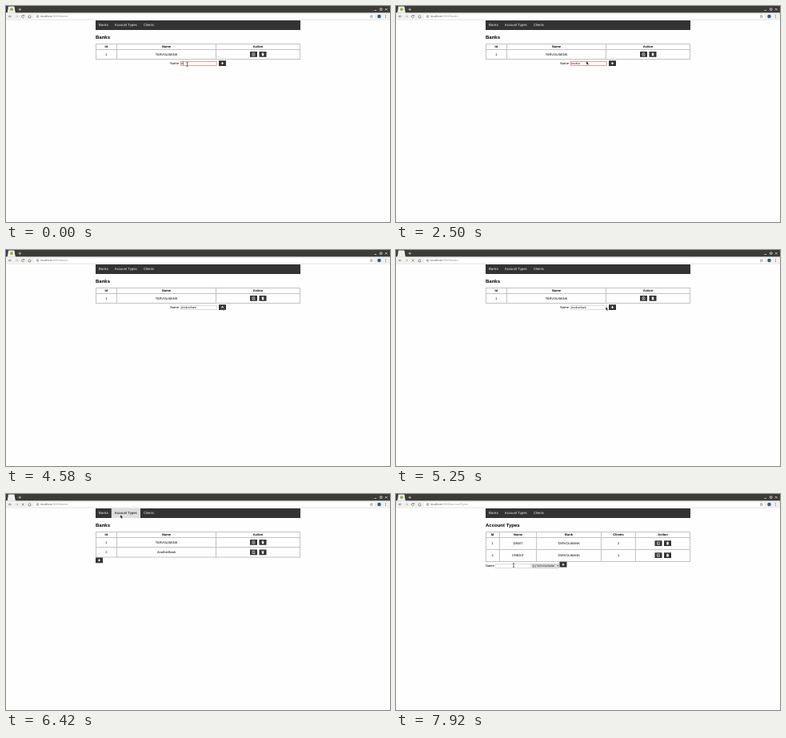
These frames come from a looping animation (480x270 px, 8000 ms). An HTML page:

```html
<!DOCTYPE html>
<html lang="en">
<head>
<meta charset="utf-8">
<title>Banks</title>
<style>
  html, body { margin: 0; width: 100%; height: 100%; overflow: hidden; background: #fff; }
  svg { display: block; width: 480px; height: 270px; }
  text { font: 16px "Liberation Sans", Arial, sans-serif; text-rendering: geometricPrecision; white-space: pre; }
  .mid { text-anchor: middle; }
  .bold { font-weight: bold; }
  .title { font-size: 24px; font-weight: bold; }
  .nav { font-size: 17px; fill: #f2f2f2; }
  .field { font-size: 13.33px; }
  .url { font-size: 14.7px; fill: #999; }
  .grid { stroke: #c3c3c7; stroke-width: 4; fill: none; }
  .icon { fill: none; stroke: #666; stroke-width: 2.5; }
</style>
</head>
<body>
<svg id="stage" viewBox="0 0 1920 1080">
  <rect width="1920" height="1080" fill="#fefefe"/>
  <g id="chrome"></g>
  <g id="nav"></g>
  <g id="pages"></g>
  <g id="arrow"><path d="M0 0V17L4 13.5L7 20L10.5 18.5L7.500 12.500H13Z" fill="#111" stroke="#fff" stroke-width="1.200"/></g>
  <g id="beam"><path d="M-4 -10Q0 -10 0 -7V7Q0 10 -4 10M4 -10Q0 -10 0 -7M0 7Q0 10 4 10" fill="none" stroke="#222" stroke-width="2.5"/></g>
</svg>
<script>
const LOOP = 8000, TICK = 1000 / 12;
const BANK = 'TARVOLIBANK', ENTRY = 'AnotherBank';
const $ = id => document.getElementById(id);
const show = (id, on) => $(id).setAttribute('visibility', on ? 'visible' : 'hidden');

const rect = (x, y, w, h, fill, extra = '') =>
  `<rect x="${x}" y="${y}" width="${w}" height="${h}" fill="${fill}" ${extra}/>`;
const text = (x, y, str, cls = '', extra = '') =>
  `<text x="${x}" y="${y}" class="${cls}" ${extra}>${str}</text>`;
const path = (d, cls = 'icon', extra = '') => `<path d="${d}" class="${cls}" ${extra}/>`;
const group = (id, ...parts) => `<g id="${id}" visibility="hidden">${parts.join('')}</g>`;

const button = (x, y, icon) =>
  `<g transform="translate(${x} ${y})">${rect(0, 0, 36, 27, '#333')}${icon}</g>`;
const PLUS = '<path d="M18 7V20M11.500 13.500H24.500" stroke="#fff" stroke-width="3.500"/>';
const EDIT = '<path d="M23 7H12V20H24V14M16 16L25 8" fill="none" stroke="#fff" stroke-width="2.500"/>';
const TRASH = '<path d="M11.500 6.500H16L17 5H19L20 6.500H24.500V9H11.500ZM13 10H23L22.500 21H13.500Z" fill="#fff"/>';
const actions = (x, y, gap) => button(x, y, EDIT) + button(x + gap, y, TRASH);

function table(cols, rows, heads, centers) {
  const [top, bottom, left, right] = [rows[0], rows.at(-1), cols[0], cols.at(-1)];
  const lines = cols.map(x => `M${x} ${top - 2}V${bottom + 2}`)
    .concat(rows.map(y => `M${left} ${y}H${right}`)).join('');
  return path(lines, 'grid') + heads.map((h, i) => text(centers[i], 208, h, 'mid bold')).join('');
}
const cells = (centers, y, values) =>
  values.map((v, i) => text(centers[i], y, v, 'mid')).join('');
const input = (x, y, color, width) =>
  rect(x + 1, y + 1, 180, 20, '#fff', `stroke="${color}" stroke-width="${width}"`);

// Browser frame
$('chrome').innerHTML = [
  rect(0, 0, 1920, 35, '#3c3b38'),
  rect(0, 34, 1920, 38, '#f1f1f0'),
  path('M4 35Q9 33 11 5Q12 2 16 2H38Q42 2 43 6Q45 33 50 35Z', '', 'fill="#f1f1f0"'),
  path('M69 10V24M62 17H76', '', 'stroke="#ccc" stroke-width="3"'),
  path('M1842 22H1852M1870 12H1880V21H1870ZM1896 12L1906 22M1906 12L1896 22', '',
    'fill="none" stroke="#ddd" stroke-width="3"'),
  rect(140, 39, 1704, 28, '#fff', 'rx="4" stroke="#ddd" stroke-width="1.5"'),
  path('M28 52H14M20 46L14 52L20 58'),
  path('M46 52H60M54 46L60 52L54 58', 'icon', 'opacity=".45"'),
  path('M110 53L118 45L126 53M113 52V59H123V52'),
  '<circle cx="158" cy="52" r="6" class="icon" style="stroke-width:2"/>',
  path('M158 51V56M158 48V49.500'),
  path('M1827 45L1829 50L1834 50.500L1830 54L1831 59L1827 56.500L1823 59L1824 54L1820 50.500L1825 50Z', 'icon', 'style="stroke-width:2"'),
  '<circle cx="1866" cy="52" r="9" fill="#355c7d"/>',
  path('M1898 45V48M1898 51V54M1898 57V60', 'icon', 'style="stroke-width:3.500"'),
  group('ready', '<circle cx="28" cy="17" r="8" fill="#93b745"/>',
    path('M90 49A6.500 6.500 0 1 0 90.500 55M91 44V50H85')),
  group('loading', path('M79 46L90 58M90 46L79 58'),
    '<path id="spinner" d="M28 9A8 8 0 0 1 36 17" fill="none" stroke="#ccc" stroke-width="2.5"/>'),
  text(172, 57, '<tspan fill="#555">localhost</tspan>:8080/<tspan id="route"></tspan>', 'url')
].join('');

$('nav').innerHTML = [
  rect(448, 72, 1024, 48, '#333'),
  group('hover', rect(527, 72, 145, 48, '#ddd')),
  text(464, 101.8, 'Banks', 'nav'),
  text(543.3, 101.8, 'Account Types', 'nav', 'id="types"'),
  text(687.7, 101.8, 'Clients', 'nav')
].join('');

// Pages
const bankCols = [450, 554, 1050, 1470], bankMid = [501, 802, 1260];
const typeCols = [450, 518, 702, 1026, 1198, 1470], typeMid = [482, 610, 864, 1112, 1334];
const bankHeads = ['Id', 'Name', 'Action'];

$('pages').innerHTML = [
  group('banks',
    text(448, 162.5, 'Banks', 'title'),
    table(bankCols, [190, 218, 266], bankHeads, bankMid),
    cells(bankMid, 247, ['1', BANK]), actions(1220, 228, 46)),
  group('bankForm',
    text(821, 292, 'Name'),
    group('invalid', input(872, 277, '#d98478', 3)),
    group('plain', input(872, 277, '#bbb', 2)),
    text(875, 291, '', 'field', 'id="entry"'),
    rect(0, 279, 2, 16, '#000', 'id="caret"'),
    button(1064, 273, PLUS)),
  group('bankAdded',
    table(bankCols, [266, 316], [], bankMid),
    cells(bankMid, 296.5, ['2', ENTRY]), actions(1220, 278, 46), button(448, 318, PLUS)),
  group('accounts',
    text(448, 162.5, 'Account Types', 'title'),
    table(typeCols, [190, 218, 278, 338], ['Id', 'Name', 'Bank', 'Clients', 'Action'], typeMid),
    cells(typeMid, 252.5, ['1', 'DEBIT', BANK, '2']), actions(1294, 233, 46),
    cells(typeMid, 313.5, ['2', 'CREDIT', BANK, '1']), actions(1294, 293, 46)),
  group('typeAdd', button(448, 339, PLUS)),
  group('typeForm',
    text(448, 364, 'Name'), input(495, 349, '#bbb', 2),
    rect(680, 350, 135, 20, '#e4e4e4', 'stroke="#aaa" stroke-width="2"'),
    text(684, 365, '[1] ' + BANK, 'field'),
    path('M804 357H812L808 363Z', '', 'fill="#333"'),
    button(818, 339, PLUS))
].join('');

// Keystroke times, one per letter of ENTRY
const KEYS = [-330, 420, 670, 1000, 1170, 1330, 1670, 2920, 3080, 3170, 3330];

// Pointer runs: shape, then [time, x, y] in stage pixels
const RUNS = [
  ['beam', [0, 226.5, 73], [1160, 226.5, 73]],
  ['beam', [1670, 227, 73], [1920, 232, 72.5]],
  ['arrow', [1920, 232, 71], [2170, 238, 69], [2660, 238, 69]],
  ['arrow', [3750, 225, 57], [3920, 212.7, 47.300], [4080, 222, 53], [4250, 258, 69],
    [4330, 270, 71], [4670, 270, 71], [4830, 285, 77], [5000, 281, 76], [5170, 263, 71.300],
    [5250, 262.7, 71.300], [5500, 232, 60], [5830, 172, 38], [6000, 152, 30], [6170, 143, 26],
    [6500, 143, 26], [6750, 145, 52], [6920, 145.7, 69], [7080, 134, 80], [7330, 116, 87],
    [7580, 116, 87], [7670, 121, 87]],
  ['beam', [7670, 122, 89], [7830, 140, 89], [7920, 147, 89], [8000, 147, 89]]
];

function pointAt(keys, t) {
  const i = Math.max(1, keys.findIndex(k => k[0] >= t));
  const [a, b] = [keys[i - 1], keys[i]];
  const f = (t - a[0]) / (b[0] - a[0]);
  return [a[1] + (b[1] - a[1]) * f, a[2] + (b[2] - a[2]) * f];
}

function drawPointer(t) {
  const run = RUNS.find(([, ...k]) => t >= k[0][0] && t < k.at(-1)[0]);
  for (const id of ['arrow', 'beam']) show(id, run && run[0] === id);
  if (!run) return;
  const [x, y] = pointAt(run.slice(1), t);
  $(run[0]).setAttribute('transform', `translate(${x * 4} ${y * 4})`);
}

function draw(now) {
  const t = Math.floor((now % LOOP + 4) / TICK) * TICK + 4;
  const within = (a, b) => t >= a && t < b;
  const onBanks = t < 6750, adding = t < 5500, focused = t < 4500;
  const loading = within(4830, 5590) || within(6330, 6830);
  const hover = within(6000, 6600);

  show('banks', onBanks);
  show('bankForm', adding);
  show('invalid', focused);
  show('plain', adding && !focused);
  show('bankAdded', onBanks && !adding);
  show('accounts', !onBanks);
  show('typeAdd', within(6750, 7420));
  show('typeForm', t >= 7420);
  show('loading', loading);
  show('ready', !loading);
  show('hover', hover);
  $('types').style.fill = hover ? '#000' : '';
  $('spinner').setAttribute('transform', `rotate(${t * .36} 28 17)`);
  $('route').textContent = onBanks ? 'banks' : 'accountTypes';

  const typed = KEYS.filter(k => k <= t);
  const entry = $('entry');
  entry.textContent = ENTRY.slice(0, typed.length);
  const blink = Math.floor((t - typed.at(-1)) / 500) % 2 === 0;
  show('caret', focused && blink);
  $('caret').setAttribute('x', 875 + entry.getComputedTextLength());

  drawPointer(t);
}

const start = performance.now();
function frame() {
  draw(performance.now() - start);
  requestAnimationFrame(frame);
}
frame();
</script>
</body>
</html>
```
